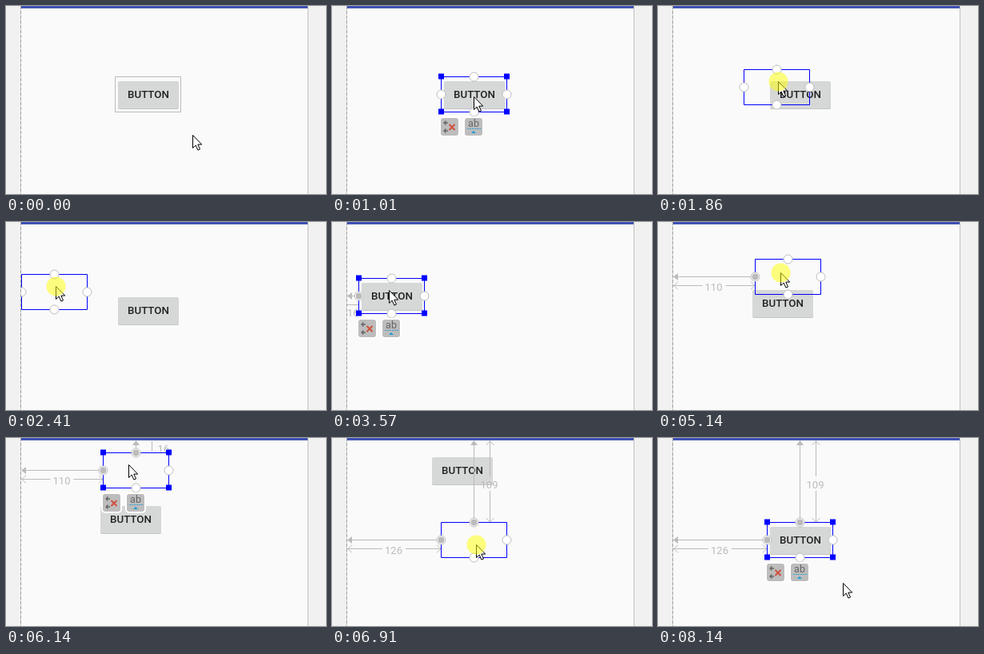
An HTML page for the animation above (8290 ms loop, 400 px wide and 235 px high).

```html
<!DOCTYPE html>
<html lang="en">
<head>
<meta charset="utf-8">
<title>Dragging a constrained button</title>
<style>
html, body { margin: 0; width: 100%; height: 100%; overflow: hidden; background: #f1f1f1; }
svg { display: block; width: 100vw; height: 100vh; }
text { font-family: Roboto, sans-serif; }
.label { font-size: 13px; fill: #bbb; }
.wire { fill: none; stroke: #bbb; }
.caption { font-size: 13.3px; font-weight: 500; fill: #222; text-anchor: middle; }
</style>
</head>
<body>
<svg viewBox="0 0 400 235" xmlns="http://www.w3.org/2000/svg">
  <defs><clipPath id="page"><path d="M19 0H378V235H19Z"/></clipPath></defs>
  <path d="M0 0H400V235H0Z" fill="#f1f1f1"/>
  <path d="M19 0H377V235H19Z" fill="#fafafa"/>
  <path d="M18.5 0V235" stroke="#d8d8d8"/>
  <path d="M18.5 0V235" stroke="#a0a0a0" stroke-dasharray="4 2"/>
  <path d="M377.5 0V235" stroke="#c0c0c0"/>
  <path d="M19 0H377V3H19Z" fill="#3f51b5"/>
  <g id="scene" clip-path="url(#page)"></g>
  <g id="pointer"></g>
</svg>
<script>
const LOOP = 8290, STEP = 75;
const W = 82, H = 44, LEFT = 19, TOP = 3, DP = 1.068;
const HOME = [136, 88], MARGIN = [33, 18], SNAP = 6;

// Pointer glides: start, end, then where it arrives
const glides = [
  [230, 860, 177, 113], [1160, 1310, 179, 103],
  [1710, 2090, 93, 75], [2260, 2410, 62, 80],
  [2640, 2720, 71, 89], [2870, 3340, 71, 85],
  [4110, 4360, 152, 94], [4510, 4510, 146, 96],
  [4980, 5140, 153, 63], [5290, 5680, 153, 33],
  [6290, 6520, 165, 46], [6750, 6910, 180, 133],
  [7670, 8140, 231, 181]
];
// Mouse down and mouse up
const presses = [[860, 935], [1560, 3490], [4040, 4430], [4900, 6140], [6600, 7060]];
const leftLinked = presses[1][1], topLinked = presses[3][1];

function progress(t, start, end) {
  if (t >= end) return 1;
  if (t < start) return 0;
  const last = Math.round((end - start) / STEP);
  return (Math.floor((t - start) / (end - start) * last) + 1) / (last + 1);
}

function cursorAt(t) {
  let x = 233, y = 161;
  for (const [start, end, tx, ty] of glides) {
    const p = progress(t, start, end);
    x += (tx - x) * p;
    y += (ty - y) * p;
  }
  return [Math.round(x), Math.round(y)];
}

const snap = (v, i) => Math.abs(v - MARGIN[i]) <= SNAP ? MARGIN[i] : v;

// The frame follows the pointer; the button lands one step after release
function stateAt(t) {
  const state = { box: HOME, button: HOME, active: false, down: false, dragging: false };
  for (const [press, drop] of presses) {
    if (t < press) break;
    const grab = cursorAt(press), now = cursorAt(Math.min(t, drop));
    const shift = now.map((v, i) => v - grab[i]);
    const moved = shift.some(Boolean);
    if (moved) state.box = state.box.map((v, i) => snap(v + shift[i], i));
    state.down = t < drop;
    state.dragging = state.down && moved;
    state.active ||= t >= drop;
    if (t >= drop + STEP) state.button = state.box;
  }
  return state;
}

const path = (d, attrs) => `<path d="${d}" ${attrs}/>`;
const wire = d => path(d, 'class="wire"');
const label = (x, y, s, anchor = 'middle') =>
  `<text class="label" x="${x}" y="${y}" text-anchor="${anchor}">${s}</text>`;

function button([x, y]) {
  const slab = (dy, fill) =>
    `<rect x="${x + 4}" y="${y + dy}" width="76" height="34" rx="2" fill="${fill}"/>`;
  return slab(7, '#c4c5c5') + slab(6, '#d6d7d7')
    + `<text class="caption" x="${x + 42}" y="${y + 27}">BUTTON</text>`;
}

function leftConstraint(x, y) {
  const line = y + 22.5, margin = line + 11, mid = (LEFT + x) / 2 - 0.5;
  const dp = Math.round((x - LEFT + 1) * DP);
  const out = path(`M${LEFT} ${line}l6 -4.5v9Z`, 'fill="#bbb"') + wire(`M${LEFT + 5} ${line}H${x}`);
  if (x < 60) return out + wire(`M${LEFT} ${margin}H${x}`) + label(LEFT, margin + 14, dp, 'start');
  return out
    + wire(`M${LEFT} ${margin}H${mid - 14}M${mid + 15} ${margin}H${x}`)
    + wire(`M${LEFT + 6} ${margin - 5}l-5 5l5 5M${x - 5} ${margin - 5}l5 5l-5 5`)
    + label(mid, margin + 6.5, dp);
}

function topConstraint(x, y) {
  const line = x + 41.5, margin = line + 20, mid = (TOP + y) / 2 + 3;
  const dp = Math.round((y - TOP) * DP);
  const out = path(`M${line} ${TOP}l-4.5 6h9Z`, 'fill="#bbb"') + wire(`M${line} ${TOP + 5}V${y}`);
  if (y < 45) return out + wire(`M${margin} ${TOP + 1}V${y - 1}`) + label(margin + 7, 18, dp, 'start');
  return out
    + wire(`M${margin} ${TOP}V${mid - 9}M${margin} ${mid + 9}V${y}`)
    + wire(`M${margin - 5} ${TOP + 6}l5 -5l5 5M${margin - 5} ${y - 5}l5 5l5 -5`)
    + label(margin - 1, mid + 5.5, dp);
}

function handle(x, y, linked) {
  return `<circle cx="${x}" cy="${y}" r="5.5" fill="#fff" stroke="#bbb"/>`
    + (linked ? `<circle cx="${x}" cy="${y}" r="4" fill="#bbb"/>` : '');
}

const frame = (x, y, color) =>
  path(`M${x + 0.5} ${y + 0.5}h${W}v${H}h${-W}Z`, `fill="none" stroke="${color}"`);

function corners(x, y) {
  let d = '';
  for (const cx of [x, x + W])
    for (const cy of [y, y + H]) d += `M${cx - 3} ${cy - 3.5}h7v7h-7Z`;
  return path(d, 'fill="#00f"');
}

function tools(x, y) {
  const tile = dx => `<rect x="${x + dx}" y="${y}" width="22" height="22" rx="3"
    fill="#bdbdbd" stroke="#fff" stroke-width="4" paint-order="stroke"/>`;
  const arrow = dy => path(`M${x + 9} ${y + dy}h-5m2.5 -2.5l-2.5 2.5l2.5 2.5`,
    'fill="none" stroke="#666" stroke-width="1.3"');
  return tile(0) + arrow(6) + arrow(16)
    + path(`M${x + 10.5} ${y + 8}l7 7m0 -7l-7 7`, 'stroke="#cf503d" stroke-width="2"')
    + tile(30)
    + `<text x="${x + 41}" y="${y + 11}" font-size="12.5" fill="#666" text-anchor="middle">ab</text>`
    + path(`M${x + 33} ${y + 13.5}h17`, 'stroke="#3a9cc8" stroke-dasharray="2 1"')
    + path(`M${x + 38} ${y + 19}l3 -3l3 3Z`, 'fill="#1c9ad6"');
}

function pointer([x, y], down) {
  const arrow = path(`M${x + 0.5} ${y + 0.5}v16l3.7 -3.4l2.7 6l2.6 -1.1l-2.7 -5.9h4.9Z`,
    'fill="#fff" stroke="#000" stroke-linejoin="round"');
  const spot = `<circle cx="${x + 0.5}" cy="${y + 0.5}" r="12" fill="#ff0" opacity=".5"/>`;
  return arrow + (down ? spot : '');
}

function guides(x, y) {
  const dash = 'stroke="#9a9a9a" stroke-dasharray="4 3"';
  return (x === MARGIN[0] ? path(`M${x + 0.5} 4V235`, dash) : '')
    + (y === MARGIN[1] ? path(`M20 ${y + 0.5}H377`, dash) : '');
}

function draw(t) {
  const { box, button: spot, active, down, dragging } = stateAt(t);
  const [x, y] = box, hasLeft = t >= leftLinked, hasTop = t >= topLinked;
  let out = button(spot);
  if (dragging) out += guides(x, y);
  if (hasLeft) out += leftConstraint(x, y);
  if (hasTop) out += topConstraint(x, y);
  out += frame(x, y, active ? '#00f' : '#bbb');

  if (active) {
    const mx = x + 41.5, my = y + 22.5;
    if (!dragging) out += corners(x, y);
    out += handle(mx, y + 0.5, hasTop) + handle(mx, y + H + 0.5)
      + handle(x + 0.5, my, hasLeft) + handle(x + W + 0.5, my);
    if (!dragging) out += tools(x, y + 52);
  }
  document.getElementById('scene').innerHTML = out;
  document.getElementById('pointer').innerHTML = pointer(cursorAt(t), down);
}

const origin = performance.now();
function tick() {
  draw((performance.now() - origin) % LOOP);
  requestAnimationFrame(tick);
}
tick();
</script>
</body>
</html>
```
